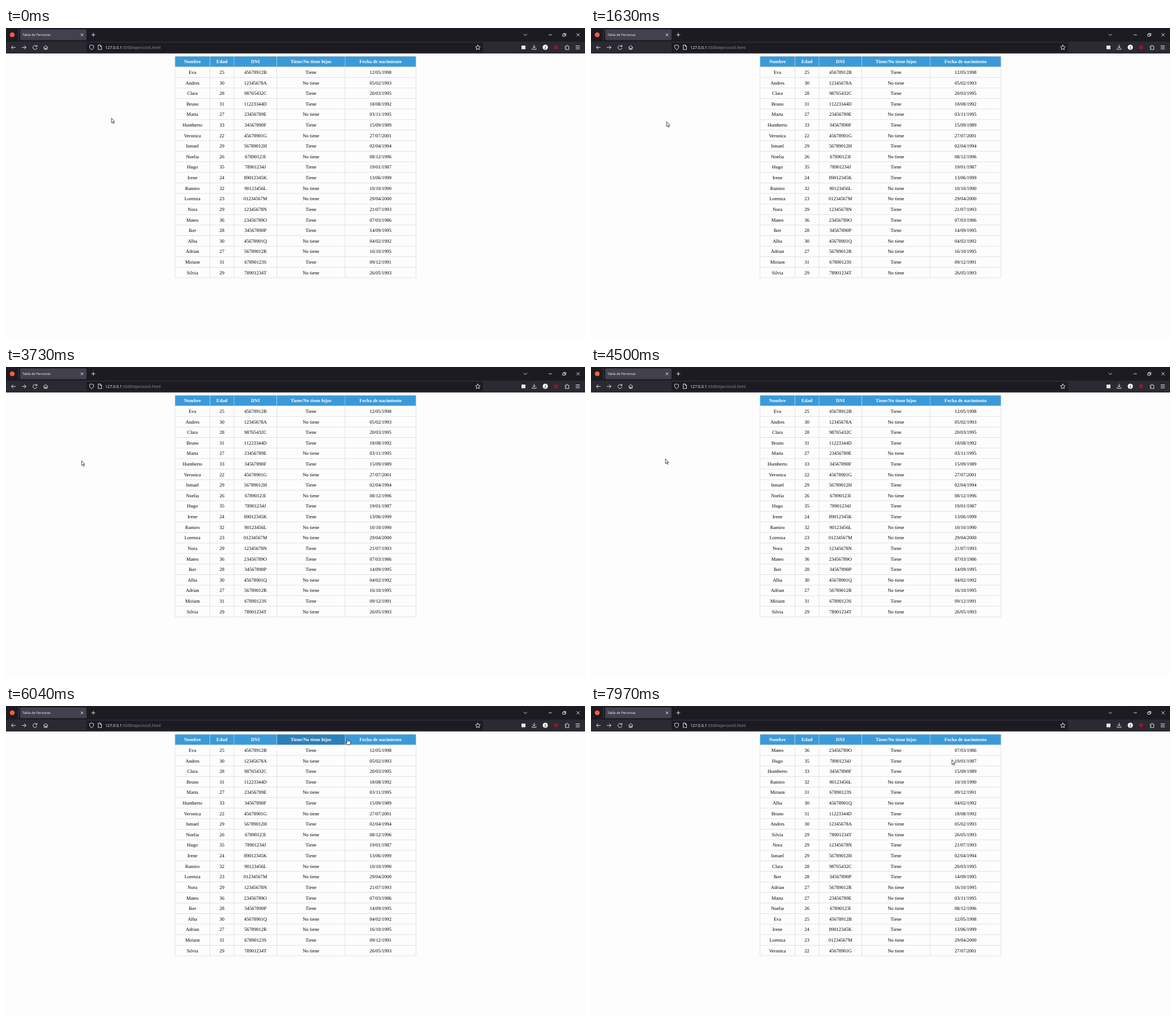
Write an HTML page that moves like this. It is 1021 px wide and 549 px high and loops after 8 s.

```html
<!DOCTYPE html>
<html lang="es">
<head>
<meta charset="utf-8">
<title>Tabla de Personas</title>
<style>
  html, body { margin: 0; width: 100%; height: 100%; overflow: hidden; background: #fdfdfd; }
  svg { display: block; width: 1021px; height: 549px; }
  text { text-rendering: geometricPrecision; }
  .ui { font-family: "Open Sans", "Noto Sans", sans-serif; fill: #fbfbfe; }
  .cell { font: 8.5px "Liberation Serif", "Times New Roman", serif; text-anchor: middle; fill: #000; }
  .head { font-weight: bold; fill: #fff; }
  .icon { fill: none; stroke: #f0f0f4; stroke-width: .9; stroke-linecap: round; stroke-linejoin: round; }
  .rule { stroke: #d6d6da; stroke-width: .7; }
</style>
</head>
<body>
<svg viewBox="0 0 1021 549">
  <rect width="1021" height="549" fill="#fdfdfd"/>
  <rect width="1021" height="45" fill="#1c1b22"/>
  <rect y="24" width="1021" height="21" fill="#2b2a33"/>
  <path d="M22 2V22" stroke="#4a4953" stroke-width=".8"/>
  <rect x="25" y="2.5" width="117" height="19" rx="2" fill="#42414d"/>
  <rect id="burst" x="25" y="2.5" height="19" rx="2" fill="#3a8fd9"/>
  <rect x="142" y="26" width="699" height="16.5" rx="2" fill="#1c1b22"/>
  <rect id="reloadHover" x="43" y="25.5" width="17" height="17.5" rx="2" fill="#5b5a66"/>
  <text class="ui" x="29" y="14.2" font-size="5.86">Tabla de Personas</text>
  <text class="ui" x="175" y="36.8" font-size="7">127.0.0.1<tspan fill="#9a99a3">:5500/ejercicio5.html</tspan></text>

  <circle cx="11" cy="12" r="4.3" fill="#ff5a3c"/>
  <rect x="909" y="31" width="7" height="6.5" fill="#e8e8ee"/>
  <circle cx="951" cy="34" r="4.6" fill="#fff"/>
  <text class="ui" x="951" y="36.3" font-size="6" font-weight="bold" text-anchor="middle" style="fill:#222">J</text>
  <circle cx="970" cy="34" r="3.6" fill="#9c1422"/>

  <g class="icon">
    <path d="M132 10l4 4m0-4l-4 4M151 12h6m-3-3v6"/>
    <path d="M913 10.7l2.8 2.8 2.8-2.8M957.3 12h5M1006.4 9.6l4.8 4.8m0-4.8l-4.8 4.8"/>
    <path d="M982 11h4v3.6h-4zM983.3 11V9.6h4v3.7h-1.3"/>
    <path d="M16.5 34.3h-7m3-3l-3 3 3 3M28.3 34.3h7m-3-3l3 3-3 3"/>
    <path d="M54 32.2a3.6 3.6 0 1 0 .6 3.2M54.6 30.4v2.4h-2.4"/>
    <path d="M66.3 34.3l3.7-3.6 3.7 3.6M67.3 33.6v4.1h5.4v-4.1M69.2 37.5v-2h1.6v2"/>
    <path d="M151 30l3.5 1.3v2.6q-.3 3-3.5 4.6-3.2-1.6-3.5-4.6v-2.6z"/>
    <path d="M163 30h3.2l2.3 2.3V38H163zM166 30.2v2.3h2.3"/>
    <path d="M832 30l1.3 2.7 2.9.4-2.1 2.1.5 2.9-2.6-1.4-2.6 1.4.5-2.9-2.1-2.1 2.9-.4z"/>
    <path d="M931.3 30v5.2m-2.3-2.3l2.3 2.3 2.3-2.3M927.8 36v1.7h7V36"/>
    <path d="M986.3 32.2h2c-.6-2.5 2.6-2.5 2 0h2.2V38h-6.2v-1.8c2.2.4 2.2-2.4 0-2z"/>
    <path d="M1005 31.5h6.4m-6.4 2.7h6.4m-6.4 2.7h6.4"/>
  </g>

  <g id="table"></g>

  <g id="cursor" stroke="#111" stroke-width=".75" stroke-linejoin="round" fill="#fff">
    <path id="arrow" d="M0 0V8.4L1.9 6.8 3.2 9.7 4.6 9.1 3.3 6.3H5.8Z"/>
    <path id="hand" d="M-.9 .7Q0-.6 .9 .7V4.2Q1.8 3.4 2.5 4.4 3.3 3.8 4 4.9 5.1 4.5 5.3 5.8V8Q5.1 9.6 4.2 10.8H-.2Q-1.5 8.6-3 6.8-3.2 5.2-.9 6.6Z"/>
  </g>
</svg>
<script>
const LOOP = 8000, SORT_AT = 6400;
const TOP = 50, HEAD_BOTTOM = 68.6, ROW = 18.62, BOTTOM = HEAD_BOTTOM + 20 * ROW;
const EDGES = [298, 359.5, 402, 477.5, 598, 723];
const TITLES = ['Nombre', 'Edad', 'DNI', 'Tiene/No tiene hijos', 'Fecha de nacimiento'];
const people = `Eva 25 45678912B Tiene 12/05/1998
Andres 30 12345678A No 05/02/1993
Clara 28 98765432C Tiene 20/03/1995
Bruno 31 11223344D Tiene 18/08/1992
Marta 27 23456789E No 03/11/1995
Humberto 33 34567890F Tiene 15/09/1989
Veronica 22 45678901G No 27/07/2001
Ismael 29 56789012H Tiene 02/04/1994
Noelia 26 67890123I No 08/12/1996
Hugo 35 78901234J Tiene 19/01/1987
Irene 24 89012345K Tiene 13/06/1999
Ramiro 32 90123456L No 10/10/1990
Lorenza 23 01234567M No 29/04/2000
Nora 29 12345678N Tiene 21/07/1993
Mateo 36 23456789O Tiene 07/03/1986
Iker 28 34567890P Tiene 14/09/1995
Alba 30 45678901Q No 04/02/1992
Adrian 27 56789012R No 16/10/1995
Miriam 31 67890123S Tiene 09/12/1991
Silvia 29 78901234T No 26/05/1993`.split('\n').map(line => {
  const cells = line.split(' ');
  if (cells[3] === 'No') cells[3] = 'No tiene';
  return cells;
});
const isoDate = person => person[4].split('/').reverse().join('-');
const byBirth = [...people].sort((a, b) => isoDate(a).localeCompare(isoDate(b)));

const $ = id => document.getElementById(id);
const table = $('table');
function add(tag, attrs, text = '') {
  const node = document.createElementNS('http://www.w3.org/2000/svg', tag);
  for (const key in attrs) node.setAttribute(key, attrs[key]);
  node.textContent = text;
  return table.appendChild(node);
}
const line = (x1, y1, x2, y2) => add('line', { class: 'rule', x1, y1, x2, y2 });
const center = col => (EDGES[col] + EDGES[col + 1]) / 2;

const headers = TITLES.map((_, c) =>
  add('rect', { x: EDGES[c], y: TOP, width: EDGES[c + 1] - EDGES[c], height: HEAD_BOTTOM - TOP }));
EDGES.forEach(x => line(x, TOP, x, BOTTOM));
for (let r = -1; r <= 20; r++) line(EDGES[0], HEAD_BOTTOM + r * ROW, EDGES[5], HEAD_BOTTOM + r * ROW);
TITLES.forEach((title, c) => add('text', { class: 'cell head', x: center(c), y: 62 }, title));
const cells = people.map((person, r) => person.map((_, c) =>
  add('text', { class: 'cell', x: center(c), y: 80.9 + r * ROW })));

let shown;
function fill(rows) {
  if (rows === shown) return;
  shown = rows;
  rows.forEach((row, r) => row.forEach((value, c) => cells[r][c].textContent = value));
}

// Pointer stops: time, x, y
const stops = [
  [0, 186, 159], [30, 186, 159], [360, 187.5, 161], [530, 187.5, 161], [1030, 133.3, 165.5],
  [4450, 133.3, 165.5], [4980, 54.5, 34], [5240, 54.5, 34], [6120, 615, 58.3], [6800, 613.5, 58],
  [6900, 613.5, 58], [7270, 635.3, 72.5], [7540, 635.3, 72.5], [7970, 636.5, 94.8], [LOOP, 636.5, 94.8]
];
function pointer(t) {
  const i = stops.findIndex(stop => stop[0] > t);
  const [t0, x0, y0] = stops[i - 1], [t1, x1, y1] = stops[i];
  const u = (t - t0) / (t1 - t0), s = u * u * (3 - 2 * u);
  return [x0 + (x1 - x0) * s, y0 + (y1 - y0) * s];
}
const inside = ([x, y], left, top, right, bottom) => x >= left && x < right && y >= top && y < bottom;
const show = (id, on) => $(id).style.display = on ? '' : 'none';

function draw(t) {
  const pos = pointer(t), lagged = pointer(Math.max(0, t - 50));
  const overHead = inside(lagged, EDGES[0], TOP, EDGES[5], HEAD_BOTTOM);
  $('cursor').setAttribute('transform', `translate(${pos})`);
  show('arrow', !overHead);
  show('hand', overHead);
  show('reloadHover', inside(lagged, 43, 25, 60, 43));
  headers.forEach((rect, c) => rect.setAttribute('fill',
    overHead && inside(lagged, EDGES[c], TOP, EDGES[c + 1], HEAD_BOTTOM) ? '#2980b9' : '#3a9ad9'));

  const load = (t - 5070) / 375;
  show('burst', load > 0 && load < 1);
  if (load > 0 && load < 1) {
    $('burst').setAttribute('width', 117 * (1 - (1 - load) ** 2));
    $('burst').setAttribute('opacity', .6 * (1 - load));
  }
  fill(t < SORT_AT ? people : byBirth);
}
const start = performance.now();
function tick() {
  draw((performance.now() - start) % LOOP);
  requestAnimationFrame(tick);
}
tick();
</script>
</body>
</html>
```
